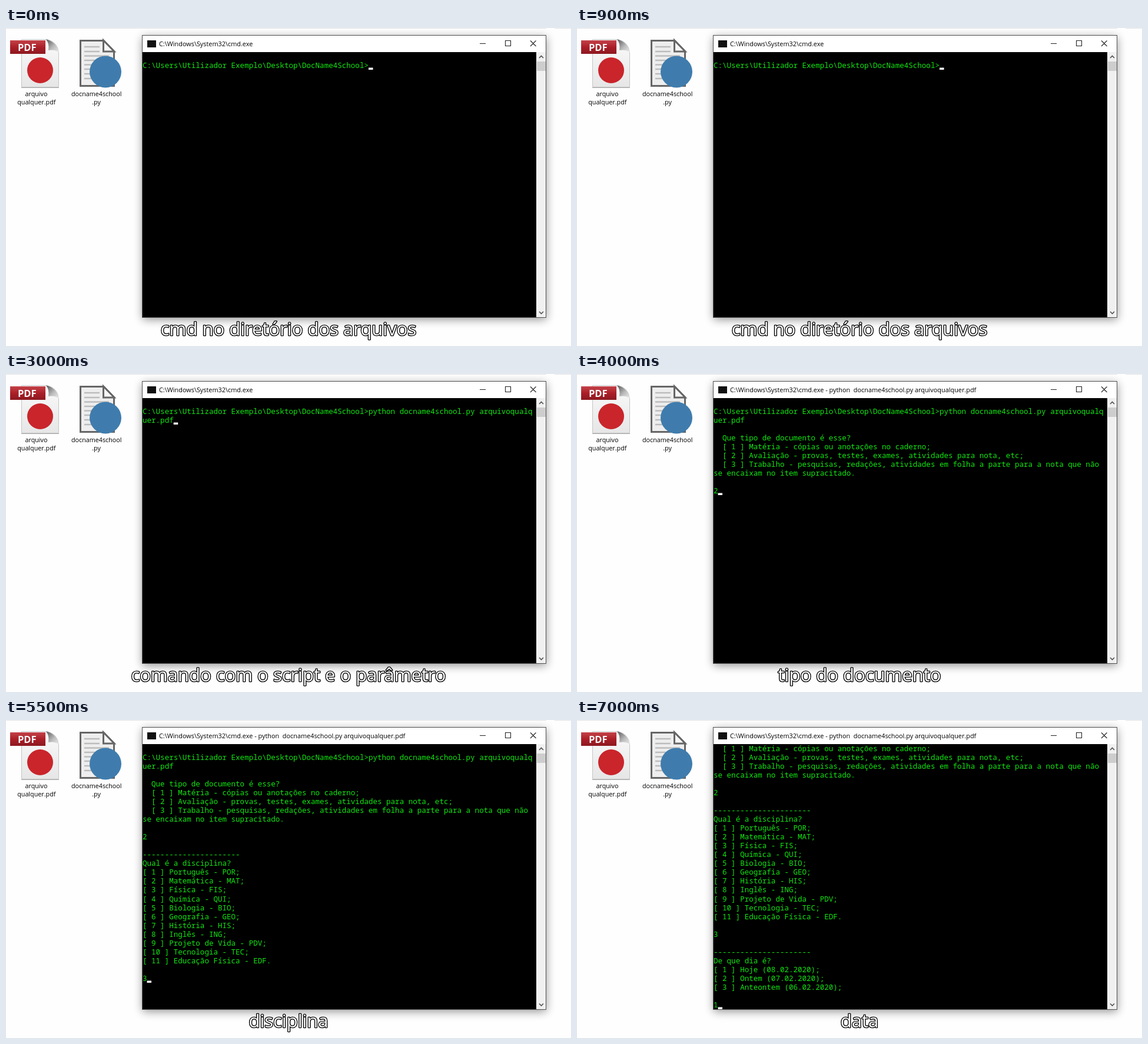
These frames come from a looping animation (960x541 px, 8000 ms). An HTML page:

```html
<!DOCTYPE html>
<html lang="pt">
<head>
<meta charset="utf-8">
<title>Terminal</title>
<style>
  html, body { margin: 0; width: 100%; height: 100%; overflow: hidden; background: #fefefe; }
  svg { display: block; width: 960px; height: 541px; }
  text { white-space: pre; font-family: "Open Sans", "Noto Sans", sans-serif; }
  .label { font-size: 10.75px; text-anchor: middle; fill: #000; }
  #title { font-size: 10.88px; fill: #000; }
  #screen text { font: 500 12.55px "Noto Sans Mono", "DejaVu Sans Mono", monospace; fill: #10e810; }
  #caption {
    font-size: 31px; font-weight: 500; text-anchor: middle; fill: #fff; stroke: #000;
    stroke-width: 2.7px; stroke-linejoin: round; paint-order: stroke;
  }
</style>
</head>
<body>
<svg viewBox="0 0 960 541">
  <defs>
    <linearGradient id="paper" x2="0" y2="1">
      <stop stop-color="#fafafa"/><stop offset="1" stop-color="#e6e6e6"/>
    </linearGradient>
    <linearGradient id="fold" x2="1" y2="1">
      <stop stop-color="#555"/><stop offset=".55" stop-color="#bbb"/><stop offset="1" stop-color="#eee"/>
    </linearGradient>
    <linearGradient id="banner" x2="0" y2="1">
      <stop stop-color="#c4434a"/><stop offset=".5" stop-color="#ab1f28"/><stop offset="1" stop-color="#8c1820"/>
    </linearGradient>
    <filter id="blur" x="-10%" y="-10%" width="120%" height="120%">
      <feGaussianBlur stdDeviation="8"/>
    </filter>
  </defs>

  <path d="M0 .5H918M932 .5H960" stroke="#e4e4e4"/>

  <g id="pdf-file">
    <path d="M26.5 19.5H70Q88 24 89.5 42V100.5H26.5Z" fill="url(#paper)" stroke="#c4c4c4"/>
    <path d="M68 19.5Q86 23 90 42Q84 36 72 38Q74 26 68 19.5Z" fill="url(#fold)"/>
    <path d="M26 101.5H90" stroke="#a8a8a8"/>
    <path d="M7 21H67V44H7Z" fill="url(#banner)"/>
    <text x="20" y="39" font-size="16.5" font-weight="700" fill="#fff">PDF</text>
    <circle cx="58" cy="72" r="22" fill="#c9252b"/>
  </g>
  <text class="label" x="51.5" y="116">arquivo</text>
  <text class="label" x="51.8" y="130">qualquer.pdf</text>

  <g id="script-file">
    <path d="M126.5 21.5H166L183.5 39.5V98.5H126.5Z" fill="#eee" stroke="#666" stroke-width="3"/>
    <path d="M165.5 21V40H184Z" fill="#f6f6f6" stroke="#666" stroke-width="3"/>
    <path d="M133 32H159M133 40H159M133 47.5H175M133 55H175M133 62.5H175M133 70H175M133 78H175M133 86H175"
          stroke="#bcbcbc" stroke-width="2.5"/>
    <circle cx="169" cy="74.5" r="27" fill="#3f7cad"/>
  </g>
  <text class="label" x="153.8" y="116">docname4school</text>
  <text class="label" x="153.5" y="130">.py</text>

  <g id="window">
    <rect x="232" y="16" width="686" height="480" fill="#000" opacity=".42" filter="url(#blur)"/>
    <rect x="231.5" y="12.5" width="686" height="480" fill="#fff" stroke="#505050"/>
    <rect x="240" y="21" width="15" height="12" fill="#111"/>
    <text id="title" x="260" y="30.5"></text>
    <path d="M805 26.5H815M848.5 21.5H857.5V30.5H848.5ZM891 21.5L900.5 31M900.5 21.5L891 31"
          fill="none" stroke="#222" stroke-width="1.1"/>
    <rect x="232" y="41" width="669" height="451" fill="#000"/>
    <rect x="901" y="41" width="16" height="451" fill="#f0f0f0"/>
    <rect x="902" y="57" width="15" height="16" fill="#cdcdcd"/>
    <path d="M906 51L909.5 47.5L913 51M906 482.5L909.5 486L913 482.5"
          fill="none" stroke="#505050" stroke-width="1.6"/>
    <g id="screen"></g>
    <rect id="cursor" width="7.5" height="3.5" fill="#fff"/>
  </g>
  <text id="caption" x="480" y="523"></text>
</svg>

<script>
const LOOP = 8000, LEFT = 232, TOP = 41, ROW = 15.03, COL = 7.53;
const $ = id => document.getElementById(id);

const prompt = ["", "C:\\Users\\Utilizador Exemplo\\Desktop\\DocName4School>"];
const command = ["", prompt[1] + "python docname4school.py arquivoqualq", "uer.pdf"];
const kinds = [...command, "",
  "  Que tipo de documento é esse?",
  "  [ 1 ] Matéria - cópias ou anotações no caderno;",
  "  [ 2 ] Avaliação - provas, testes, exames, atividades para nota, etc;",
  "  [ 3 ] Trabalho - pesquisas, redações, atividades em folha a parte para a nota que não",
  "se encaixam no item supracitado.", "", "2"];
const subjects = ["Português - POR;", "Matemática - MAT;", "Física - FIS;", "Química - QUI;",
  "Biologia - BIO;", "Geografia - GEO;", "História - HIS;", "Inglês - ING;",
  "Projeto de Vida - PDV;", "Tecnologia - TEC;", "Educação Física - EDF."];
const days = ["Hoje (08.02.2020);", "Ontem (07.02.2020);", "Anteontem (06.02.2020);"];

const menu = (question, items, answer) => ["", "-".repeat(22), question,
  ...items.map((item, i) => `[ ${i + 1} ] ${item}`), "", answer];
const discipline = [...kinds, ...menu("Qual é a disciplina?", subjects, "3")];
const date = [...discipline, ...menu("De que dia é?", days, "1")];

const idle = "C:\\Windows\\System32\\cmd.exe";
const running = idle + " - python  docname4school.py arquivoqualquer.pdf";

const steps = [
  { at: 0, title: idle, lines: prompt, caption: "cmd no diretório dos arquivos" },
  { at: 1500, title: idle, lines: command, caption: "comando com o script e o parâmetro" },
  { at: 4000, title: running, lines: kinds, caption: "tipo do documento" },
  { at: 5500, title: running, lines: discipline, caption: "disciplina" },
  { at: 7000, title: running, lines: date, caption: "data" },
];

function show({ title, lines, caption }) {
  const visible = lines.slice(-30);
  const last = visible.length - 1;
  $("title").textContent = title;
  $("caption").textContent = caption;
  $("screen").replaceChildren(...visible.map((line, row) => {
    const text = document.createElementNS("http://www.w3.org/2000/svg", "text");
    text.setAttribute("x", LEFT);
    text.setAttribute("y", TOP + row * ROW + 12);
    text.textContent = line;
    return text;
  }));
  $("cursor").setAttribute("x", LEFT + visible[last].length * COL);
  $("cursor").setAttribute("y", Math.round(TOP + (last + 1) * ROW) - 3.5);
}

let current;
function tick(now) {
  const time = now % LOOP;
  const step = steps.findLast(s => s.at <= time) || steps[0];
  if (step !== current) show(current = step);
  requestAnimationFrame(tick);
}
tick(0);
</script>
</body>
</html>
```
